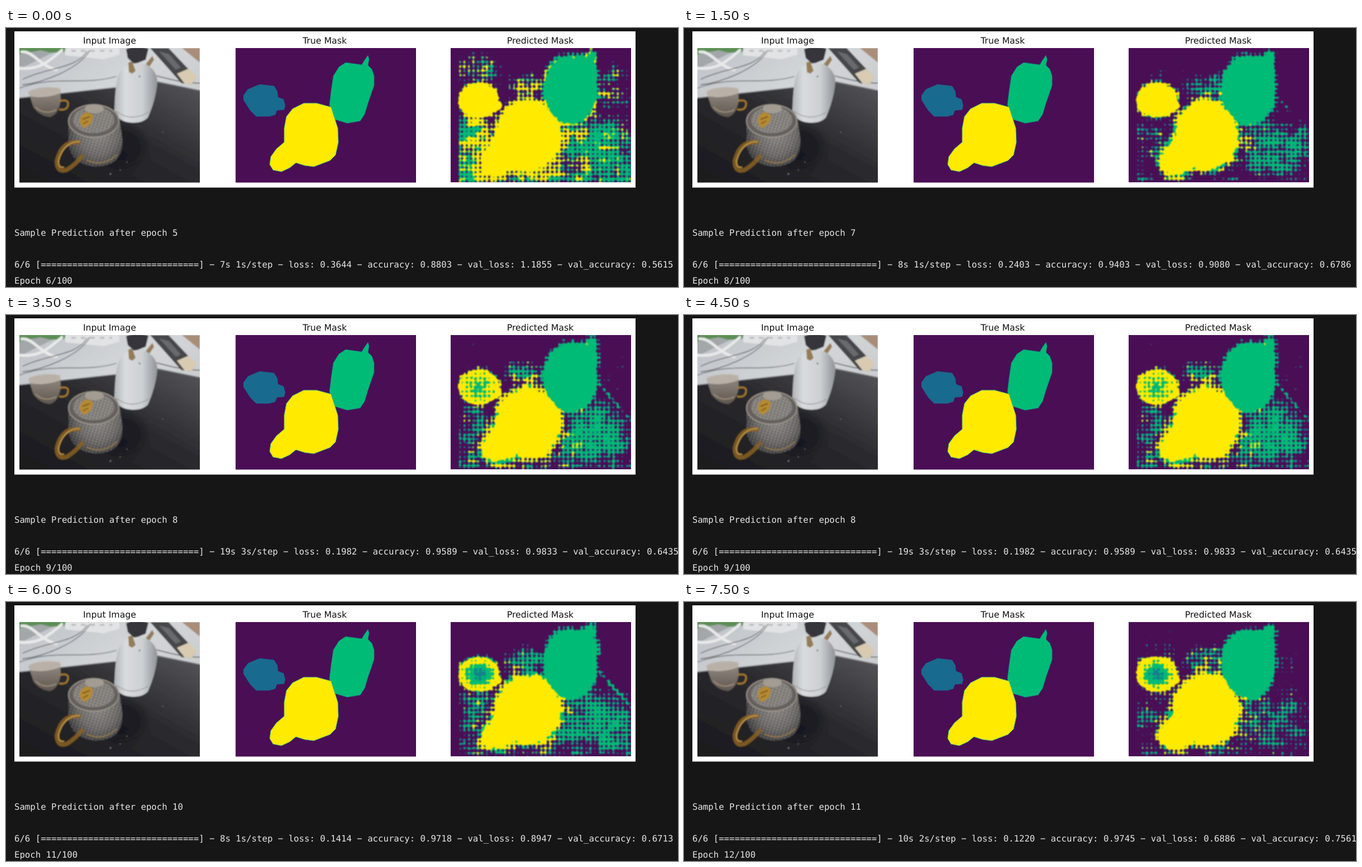
An HTML page with a canvas that plays this animation: 1203x465 px, repeating every 8000 ms.

```html
<!DOCTYPE html>
<html lang="en">
<head>
<meta charset="utf-8">
<title>Segmentation training</title>
<style>
html, body { margin: 0; width: 100%; height: 100%; overflow: hidden; background: #161616; }
svg { position: absolute; left: 0; top: 0; }
canvas { position: absolute; left: 796px; top: 36px; }
text { text-rendering: geometricPrecision; }
.title { font: 15.75px "DejaVu Sans", sans-serif; text-anchor: middle; fill: #111; }
.log { font: 15.68px "DejaVu Sans Mono", monospace; fill: #e6e6e6; }
</style>
</head>
<body>
<svg width="1203" height="465" viewBox="0 0 1203 465">
  <defs>
    <clipPath id="photo"><rect x="24" y="36" width="323" height="241.5"/></clipPath>
    <linearGradient id="desk" x2="1" y2="1"><stop stop-color="#bcc1c6"/><stop offset=".4" stop-color="#d3d6d9"/><stop offset="1" stop-color="#c0c0c1"/></linearGradient>
    <linearGradient id="mat" x1="0" y1="1" x2="1" y2="0"><stop stop-color="#19191c"/><stop offset=".55" stop-color="#2b2b2f"/><stop offset="1" stop-color="#58575a"/></linearGradient>
    <linearGradient id="shell"><stop stop-color="#b0b4b8"/><stop offset=".25" stop-color="#d9dcde"/><stop offset=".65" stop-color="#cdd0d3"/><stop offset="1" stop-color="#8f9398"/></linearGradient>
    <radialGradient id="glass" cx=".55" cy=".45" r=".62"><stop stop-color="#8f8c88"/><stop offset=".6" stop-color="#6c6a68"/><stop offset="1" stop-color="#39383a"/></radialGradient>
    <linearGradient id="tint" x2="0" y2="1"><stop stop-color="#b3aaa0"/><stop offset="1" stop-color="#6d6258"/></linearGradient>
    <pattern id="bumps" width="6" height="5" patternUnits="userSpaceOnUse" patternTransform="rotate(18)">
      <circle cx="1.5" cy="1.5" r="1.2" fill="#ddd9d0" opacity=".28"/><circle cx="4.5" cy="4" r="1.3" fill="#27262a" opacity=".3"/>
    </pattern>
    <path id="pot" d="M112 166Q114 140 156 136 199 140 203 164L208 196Q211 230 190 242 168 253 143 246 115 237 112 208Z"/>
    <filter id="soft" x="-20%" y="-20%" width="140%" height="140%"><feGaussianBlur stdDeviation=".8"/></filter>
    <filter id="shade" x="-40%" y="-40%" width="180%" height="180%"><feGaussianBlur stdDeviation="7"/></filter>
  </defs>
  <rect width="1203" height="465" fill="#161616"/>
  <rect x="15" y="6" width="1112" height="280.5" fill="#fff"/>
  <text class="title" x="185.5" y="28">Input Image</text>
  <text class="title" x="570.5" y="28">True Mask</text>
  <text class="title" x="956.5" y="28">Predicted Mask</text>

  <g clip-path="url(#photo)"><g filter="url(#soft)">
    <rect x="20" y="30" width="334" height="252" fill="url(#desk)"/>
    <path d="M20 30H112L104 43 62 46 20 56Z" fill="#5b8f54"/>
    <path d="M20 48 62 40 82 45 28 72 20 70Z" fill="#a3a7aa"/>
    <path d="M106 36H203V48L175 56 106 49Z" fill="#e2e3e4"/>
    <path d="M117 41H190" stroke="#b5b8ba" stroke-width="3" stroke-dasharray="8 9"/>
    <g fill="none" stroke-linecap="round">
      <path d="M24 72C60 76 76 60 100 40M28 43C48 40 60 68 90 75" stroke="#e8e9e9" stroke-width="5"/>
      <path d="M30 92C75 70 125 74 145 42M24 108C85 84 140 104 197 87M150 40C130 75 65 98 30 102M270 86C300 94 323 99 347 99" stroke="#54575a" stroke-width="1.3"/>
    </g>
    <path d="M258 36H291L340 88 333 101 314 99Z" fill="#46474a"/>
    <path d="M274 42 292 47 313 71 304 75Z" fill="#686a6d"/>
    <path d="M306 82 327 73 341 87 333 101 320 100Z" fill="#d8cbb2"/>
    <path d="M315 36H347V62Z" fill="#a98d78"/>
    <path d="M20 126 195 107 272 96 354 113V282H20Z" fill="url(#mat)"/>
    <path d="M20 126 195 107M271 97 350 113" stroke="#76777a" stroke-width="1.5"/>
    <ellipse cx="205" cy="214" rx="42" ry="36" fill="#101114" opacity=".5" filter="url(#shade)"/>
    <path d="M215 38Q231 30 255 37L250 57 230 65 218 54Z" fill="#34353b"/>
    <path d="M194 151C195 124 196 91 205 77Q215 64 235 63C257 63 271 78 271 98C269 121 262 143 254 161Q244 171 226 170Q202 169 194 151Z" fill="url(#shell)"/>
    <path d="M197 149Q224 170 255 151" fill="none" stroke="#92969a" stroke-width="1.3"/>
    <path d="M219 62 226 60 232 77 226 82 220 79ZM262 50 265 57 257 69 250 65Z" fill="#957c57"/>
    <circle cx="239" cy="87" r="1.5" fill="#626970"/>
    <path d="M40 114Q61 102 97 108L98 130Q94 155 79 160 60 158 49 142Z" fill="url(#tint)" opacity=".8"/>
    <ellipse cx="69" cy="115" rx="29" ry="8" transform="rotate(-5 69 115)" fill="#b9b1a7" stroke="#c3bbb0"/>
    <path d="M53 142Q68 157 90 147" fill="none" stroke="#aa9a80" stroke-width="1.5"/>
    <path d="M96 131Q113 127 111 138T95 146" fill="none" stroke="#a87a2c" stroke-width="3"/>
    <use href="#pot" fill="url(#glass)"/>
    <use href="#pot" fill="url(#bumps)"/>
    <ellipse cx="157" cy="167" rx="45" ry="29" fill="#65615e" stroke="#a0978c" stroke-width="1.8"/>
    <ellipse cx="157" cy="165" rx="37" ry="24" fill="#85817d"/>
    <ellipse cx="157" cy="165" rx="36" ry="23" fill="url(#bumps)"/>
    <ellipse cx="158" cy="145" rx="17" ry="8" fill="#a39c93"/>
    <path d="M132 170Q132 153 147 151L156 157 152 172 139 180Z" fill="#b58a30"/>
    <path d="M137 164 150 159M138 172 147 167" stroke="#79551c" stroke-width="2"/>
    <path d="M134 206C108 201 96 217 91 239Q91 260 108 255 123 247 138 228" fill="none" stroke="#8a6224" stroke-width="7.5" opacity=".85"/>
    <path d="M132 204C111 203 99 219 94 238Q93 252 104 250" fill="none" stroke="#c49a48" stroke-width="2"/>
    <path d="M144 237Q174 251 199 227" fill="none" stroke="#ac884b" stroke-width="2" opacity=".7"/>
    <path d="M186 263 188 261M204 255H205M216 241H217M280 187H281" stroke="#9a9a9c" stroke-width="1.5"/>
  </g></g>

  <rect x="411" y="36" width="323" height="241.5" fill="#4a0e55"/>
  <path d="M425 121 433 110 454 101 480 104 486 114 487 124 497 128 500 139 498 147 485 148 482 156 471 159H448L437 148 425 129Z" fill="#186a8e"/>
  <path d="M579 138 582 113 586 86 596 70 608 62 637 66 641 59 648 49 650 56 648 67 655 74 659 86V103L648 135 642 155 634 167 611 171 588 164Z" fill="#00bb75" stroke="#1d738c" stroke-width=".7"/>
  <path d="M533 135H556L582 142 587 158 594 180 595 205 590 228 580 238 551 249 535 247 519 242 508 251 493 258 478 255 472 245 474 231 484 217 498 205V180L502 159 513 145Z" fill="#ffea00" stroke="#48b678"/>

  <text class="log" id="sample" x="15" y="373"/>
  <text class="log" id="metrics" x="15" y="430"/>
  <text class="log" id="next" x="15" y="459"/>
</svg>
<canvas id="mask" width="323" height="241"></canvas>
<script>
const LOOP = 8000, W = 323, H = 241, LEFT = 796, TOP = 36, CELL = 8.075;
const COLORS = [[74, 14, 85], [20, 128, 140], [0, 187, 117], [255, 234, 0]];

// noise: strength of the speckle left, right, top, middle, upper right, bottom,
// then the share of yellow, the hollow of the cup and the diagonal streak
const EPOCHS = [
  { n: 5, start: 0, time: "7s 1s", log: "0.3644 0.8803 1.1855 0.5615", noise: [.72, .7, .54, .56, .42, .6, .36, 0, 0] },
  { n: 6, start: 500, time: "7s 1s", log: "0.2924 0.9170 1.1819 0.5762", noise: [.58, .8, .4, .56, .38, .5, .22, 0, 0] },
  { n: 7, start: 1500, time: "8s 1s", log: "0.2403 0.9403 0.9080 0.6786", noise: [.45, .59, .28, .54, .2, .36, .06, 0, .42] },
  { n: 8, start: 3500, time: "19s 3s", log: "0.1982 0.9589 0.9833 0.6435", noise: [.5, .67, .3, .54, .24, .44, .1, .4, .6] },
  { n: 9, start: 5000, time: "10s 2s", log: "0.1647 0.9682 1.1888 0.5790", noise: [.6, .76, .38, .6, .44, .58, .24, .6, .75] },
  { n: 10, start: 6000, time: "8s 1s", log: "0.1414 0.9718 0.8947 0.6713", noise: [.52, .64, .25, .6, .15, .44, .02, .95, .6] },
  { n: 11, start: 7000, time: "10s 2s", log: "0.1220 0.9745 0.6886 0.7561", noise: [.44, .51, .34, .56, .24, .38, .2, .9, .2] },
];

// Ellipses: centre x, centre y, radius x, radius y
const REGIONS = [[838, 212, 42, 68], [1050, 216, 82, 60], [844, 78, 46, 32], [935, 106, 44, 26], [1085, 108, 36, 54]];
const POT = [[935, 193, 56, 60], [899, 219, 31, 34], [879, 238, 27, 24]];
const KETTLE = [[1009, 112, 46, 60], [1030, 81, 26, 29], [1047, 55, 6, 9]];
const CUP = [846, 129, 36, 31], CUP_HANDLE = [877, 139, 10, 9];

const $ = id => document.getElementById(id);
const reach = (x, y, [cx, cy, rx, ry]) => Math.hypot((x - cx) / rx, (y - cy) / ry);
const inside = (x, y, shapes) =>
  Math.max(...shapes.map(s => (1 - reach(x, y, s)) * Math.min(s[2], s[3])));

function hash(x, y, seed) {
  let h = Math.imul(x, 374761393) ^ Math.imul(y, 668265263) ^ Math.imul(seed, 974634541);
  h = Math.imul(h ^ h >>> 13, 1274126177);
  return ((h ^ h >>> 16) >>> 0) / 4294967296;
}

// Smooth noise in -1..1
function noise(x, y, seed) {
  const i = Math.floor(x), j = Math.floor(y), ease = t => t * t * (3 - 2 * t);
  const u = ease(x - i), v = ease(y - j), mix = (a, b, t) => a + (b - a) * t;
  const row = k => mix(hash(i, k, seed), hash(i + 1, k, seed), u);
  return mix(row(j), row(j + 1), v) * 2 - 1;
}

function classify(x, y, epoch) {
  const [yellow, hollow, streak] = epoch.noise.slice(6);
  const waveX = Math.cos((x - LEFT) * 2 * Math.PI / CELL), waveY = Math.cos((y - TOP) * 2 * Math.PI / CELL);
  const lattice = (waveX + waveY) * .32 + Math.max(waveX, waveY) * .36 - .12;
  const fine = noise(x / 5, y / 5, epoch.n), broad = noise(x / 17, y / 17, 40 + epoch.n);

  const pot = inside(x, y, POT);
  if (pot + fine * 2 + lattice > 0) return 3;
  if (inside(x, y, KETTLE) + fine * 2 + lattice > 0) return 2;
  const cup = reach(x, y, CUP);
  if (cup + fine * .06 < 1 || reach(x, y, CUP_HANDLE) + fine * .1 < 1) {
    const hole = hollow * (1.15 - cup * 1.4) - lattice * .22 + fine * .2;
    return !hollow || hole < .2 ? 3 : hole < .72 ? 2 : 1;
  }

  let density = 0;
  REGIONS.forEach((region, i) => {
    density = Math.max(density, epoch.noise[i] * Math.exp(-(reach(x, y, region) ** 3) * .55));
  });
  if (y > 236) density = Math.max(density, epoch.noise[5] * Math.min(1, (y - 236) / 12));
  const nearCup = Math.max(0, (cup - 1) * 32);
  density = Math.max(density, .92 * Math.exp(pot / 15), .7 * Math.exp(-nearCup / 8),
    .88 * Math.exp(inside(x, y, KETTLE) / 9));
  if (x > 1050 && y > 105) {
    const off = Math.abs((y - 110) - (x - 1050) * 1.16) / 1.53;
    density = Math.max(density, streak * Math.exp(-((off / 6) ** 2)));
  }
  density *= Math.min(1, Math.max(0, (x - 803) / 9));

  const threads = noise(x / 38, y / 4, 120 + epoch.n) + noise(x / 4, y / 38, 160 + epoch.n);
  const score = density + lattice * .22 + broad * .12 + fine * .1 + threads * .07 - .52;
  if (score < 0) return 0;
  if (score < .07) return 1;
  const warmth = yellow + .6 * Math.exp(pot / 16) + .45 * Math.exp(-nearCup / 12) + lattice * .16
    + noise(x / 13, y / 9, 80 + epoch.n) * .34 + threads * .1 + fine * .12 - (x > 1045 ? .12 : 0);
  return warmth > .52 ? 3 : 2;
}

function predict(epoch) {
  const canvas = document.createElement("canvas");
  canvas.width = W;
  canvas.height = H;
  const ctx = canvas.getContext("2d"), image = ctx.createImageData(W, H);
  for (let y = 0, p = 0; y < H; y++) {
    for (let x = 0; x < W; x++, p += 4) {
      image.data.set(COLORS[classify(x + LEFT, y + TOP, epoch)], p);
      image.data[p + 3] = 255;
    }
  }
  ctx.putImageData(image, 0, 0);
  return canvas;
}

const masks = EPOCHS.map(predict);
const mask = $("mask").getContext("2d");
let shown = -1;

function render(time) {
  const index = EPOCHS.findLastIndex(e => e.start <= time);
  if (index === shown) return;
  shown = index;
  const { n, time: spent, log } = EPOCHS[index];
  const [loss, accuracy, valLoss, valAccuracy] = log.split(" ");
  $("sample").textContent = `Sample Prediction after epoch ${n}`;
  $("metrics").textContent = [`6/6 [${"=".repeat(30)}]`, `${spent}/step`, `loss: ${loss}`,
    `accuracy: ${accuracy}`, `val_loss: ${valLoss}`, `val_accuracy: ${valAccuracy}`].join(" − ");
  $("next").textContent = `Epoch ${n + 1}/100`;
  mask.fillStyle = `rgb(${COLORS[0]})`;
  mask.fillRect(0, 0, W, H);
  mask.filter = "blur(.9px)";
  mask.drawImage(masks[index], 0, 0);
  mask.filter = "none";
}

const begin = performance.now();
function tick() {
  render((performance.now() - begin) % LOOP);
  requestAnimationFrame(tick);
}
tick();
</script>
</body>
</html>
```
